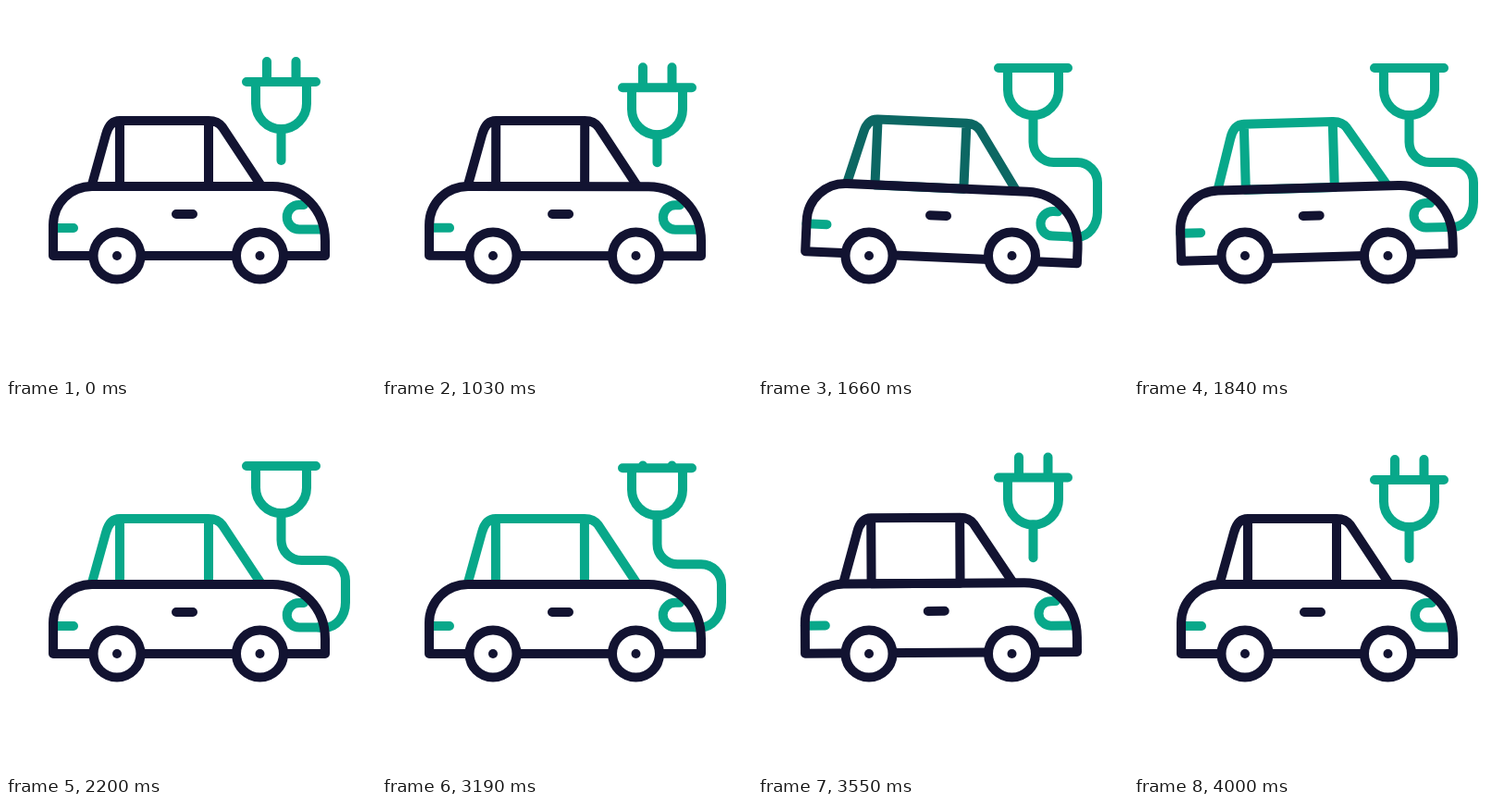
An HTML page that plays this animation: 400x400 px, repeating every 4.12 s.

```html
<!DOCTYPE html>
<html lang="en">
<head>
<meta charset="utf-8">
<title>Electric car</title>
<style>
  html, body { margin: 0; height: 100%; overflow: hidden; background: #fff; }
  svg { display: block; width: 100%; height: 100%; }
  .line { fill: none; stroke: #121331; stroke-width: 10; stroke-linecap: round; stroke-linejoin: round; }
  .green { stroke: #08a88a; }
</style>
</head>
<body>
<svg viewBox="0 0 400 400">
  <defs>
    <g id="wheel">
      <circle r="25.5" fill="#fff"/>
      <circle r="5" fill="#121331" stroke="none"/>
    </g>
  </defs>
  <g class="line">
    <path id="cable" class="green"/>
    <path id="plug" class="green"/>
    <g id="car">
      <path id="cabin" d="M93 193 L108 139 Q112 124 123 124 H219 Q229 124 234 131 L275 193 M123 124 V195 H219 V124"/>
      <path class="green" d="M51 240 H73 M341 241.5 H317 a13 13 0 0 1 0 -26.5 h5"/>
      <path d="M120 270 H51 V237 C51 213 70 195 93 195 H288 C320 195 345 220 345 254 V270 H120 M184 225 h18"/>
    </g>
    <use href="#wheel" x="120" y="270"/>
    <use href="#wheel" x="274.5" y="270"/>
  </g>
</svg>
<script>
const LOOP = 4120, PLUG_IN = 1000, PLUG_OUT = 3160;
const [cable, plug, car, cabin] =
  ['cable', 'plug', 'car', 'cabin'].map(id => document.getElementById(id));

const progress = (t, start, end) => Math.min(1, Math.max(0, (t - start) / (end - start)));
const bump = (t, start, end) => Math.sin(Math.PI * progress(t, start, end));
const ramp = (t, start, end) => {
  const k = progress(t, start, end);
  return k * k * (3 - 2 * k);
};

// Rocks the car and returns the height of its socket
function drawCar(t) {
  const swing = start => Math.sin((t - start) / 640 * 2 * Math.PI);
  const rockIn = ramp(t, PLUG_IN, 1270) - ramp(t, 1700, 2220);
  const rockOut = ramp(t, PLUG_OUT, 3400) - ramp(t, 3550, 4000);
  const angle = 3 * (rockIn * swing(1445) - rockOut * swing(3540));
  const bob = 1.8 * rockIn - 1.2 * rockOut;
  car.setAttribute('transform', `translate(0 ${bob}) rotate(${angle} 200 270)`);

  const charged = ramp(t, 1520, 1780) - ramp(t, 3220, 3460);
  cabin.style.stroke = `color-mix(in srgb, #08a88a ${100 * charged}%, #121331)`;
  return 241.5 + bob + 145 * Math.sin(angle * Math.PI / 180);
}

function drawPlug(t, socketY) {
  const raised = ramp(t, 1060, 1400) - ramp(t, 3170, 3400);
  const seated = ramp(t, 1090, 1380) - ramp(t, 3150, 3330);
  const unrolled = ramp(t, 1020, 1370) - ramp(t, 3190, 3480);
  const squash = bump(t, 1330, 1550);
  const recoil = 12 * bump(t, PLUG_IN, 1180) + 5 * bump(t, PLUG_OUT, 3400) - 2.5 * bump(t, 3400, 3700);

  const x = 297.5, y = 82 - 15 * raised + recoil;
  const bar = 37.5 + 2.5 * squash, r = 27.5 + 2 * squash, drop = 23.5 - 3 * squash;
  const prongs = [282, 313.5].map(px => `M${px} ${y} v${-22 * (1 - seated)}`).join('');
  plug.setAttribute('d', `M${x - bar} ${y} h${2 * bar} ${prongs}
    M${x - r} ${y} v${drop} a${r} 27.5 0 0 0 ${2 * r} 0 V${y}`);

  const bottom = y + drop + 27.5;
  const bend = 169 + Math.min(22, 1.8 * (bottom - 118));
  cable.setAttribute('d', `M${x} ${bottom} V${bend - 22} a22 22 0 0 0 22 22 H345
    a22 22 0 0 1 22 22 V${socketY - 27} A22 27 0 0 1 345 ${socketY} h-7`);
  const stem = 34 - 0.7 * (y - 82);
  const length = stem + (cable.getTotalLength() + 1 - stem) * unrolled;
  cable.setAttribute('stroke-dasharray', `${length} 999`);
}

function frame(now) {
  const t = now % LOOP;
  drawPlug(t, drawCar(t));
  requestAnimationFrame(frame);
}
frame(0);
</script>
</body>
</html>
```
